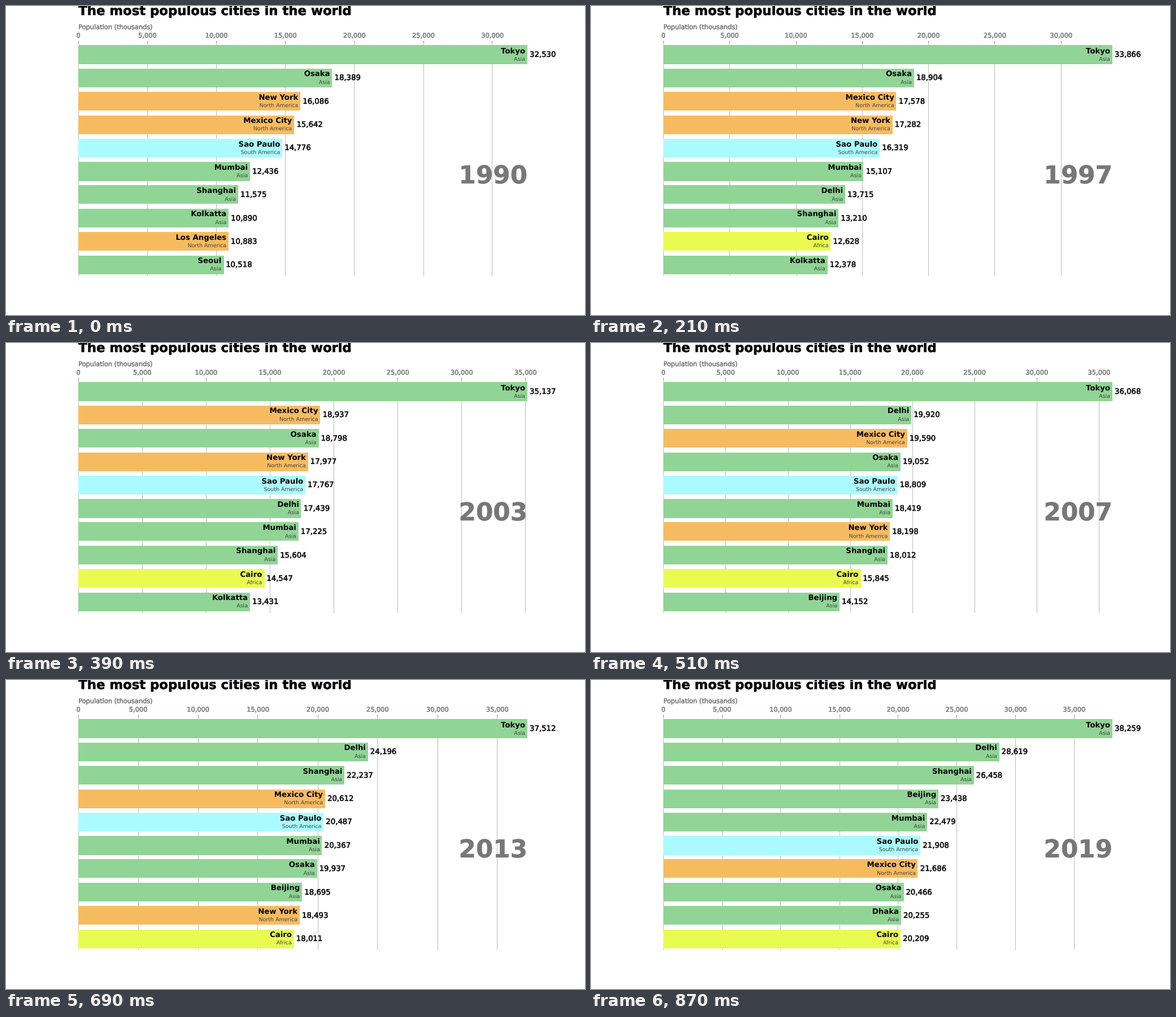
Animation, 1025 px wide and 547 px high, one loop 900 ms. Source, as an HTML page:

```html
<!DOCTYPE html>
<html lang="en">
<head>
<meta charset="utf-8">
<title>The most populous cities in the world</title>
<style>
  html, body { margin: 0; width: 100%; height: 100%; overflow: hidden; background: #fff; }
  svg { display: block; width: 100%; height: 100%; }
  text {
    font-family: "DejaVu Sans", Verdana, sans-serif;
    text-rendering: geometricPrecision;
    stroke-width: .6px;
  }
  .title { font-size: 22.78px; font-weight: 700; stroke: #000; }
  .axis { font-size: 11.39px; fill: #777; stroke: #777; }
  .tick { text-anchor: middle; }
  .year { font-size: 43.65px; font-weight: 700; fill: #777; stroke: #777; text-anchor: end; }
  .name { font-size: 13.28px; font-weight: 700; text-anchor: end; }
  .group { font-size: 9.49px; fill: #444; text-anchor: end; }
  .value { font-size: 13.28px; stroke: #000; }
</style>
</head>
<body>
<svg id="stage" viewBox="0 0 1025 547"></svg>
<script>
// The chart is laid out on a 1080 x 576 sheet and scaled to the stage
const SCALE = 547 / 576;
const LEFT = 135, WIDTH = 837, PAD = WIDTH / 200;
const FIRST_BAR = 73.37, ROW_STEP = 43.506, BAR = 0.8 * ROW_STEP;
const FIRST_YEAR = 1990, YEARS = 30, STEP_MS = 30, ROWS = 10, GAP = 5;

const COLORS = {
  'Asia': '#90d595',
  'North America': '#f7bb5f',
  'South America': '#aafbff',
  'Africa': '#eafb50'
};

// Key populations in thousands, one slot per five years from 1990;
// empty slots are filled with constant growth
const CITIES = [
  ['Tokyo', 'Asia', [32530, , 34450, , , 38001, 38323]],
  ['Osaka', 'Asia', [18389, 18940, , 18762, , 20238, 20523]],
  ['New York', 'North America', [16086, , 17813, , 18365, , 18793]],
  ['Mexico City', 'North America', [15642, , 18457, , , , 21868]],
  ['Sao Paulo', 'South America', [14776, , 17014, , , 21066, 22119]],
  ['Mumbai', 'Asia', [12436, , 16367, , , 21043, 22838]],
  ['Shanghai', 'Asia', [11575, , 13959, , 19980, 23741, 27137]],
  ['Kolkatta', 'Asia', [10890, , 13058, , , , 15726]],
  ['Los Angeles', 'North America', [10883, , , , , , 12500]],
  ['Seoul', 'Asia', [10518, , , , , , 9800]],
  ['Buenos Aires', 'South America', [10513, , , , , , 15894]],
  ['Delhi', 'Asia', [9726, , 15732, , 21935, 25703, 29348]],
  ['Cairo', 'Africa', [9892, 11962, 13626, , , 18772, 20568]],
  ['Beijing', 'Asia', [6788, , , 12813, , 20384, 24201]],
  ['Dhaka', 'Asia', [6621, , , , , , 20989]]
].map(([name, group, keys]) => ({ name, group, data: fill(keys) }));

function fill(keys) {
  const data = [...keys];
  for (let i = 1; i < data.length; i++) {
    if (data[i]) continue;
    const next = data.findIndex((v, j) => j > i && v);
    data[i] = data[i - 1] * (data[next] / data[i - 1]) ** (1 / (next - i + 1));
  }
  return data;
}

function population({ data }, index) {
  const k = Math.floor(index / GAP);
  return data[k] + (data[k + 1] - data[k]) * (index % GAP) / GAP;
}

const stage = document.getElementById('stage');

function set(el, attrs) {
  for (const key in attrs) el.setAttribute(key, attrs[key]);
}

function add(tag, attrs, content = '') {
  const el = document.createElementNS('http://www.w3.org/2000/svg', tag);
  set(el, attrs);
  el.textContent = content;
  return stage.appendChild(el);
}

function label(el, x, content) {
  set(el, { x: x * SCALE });
  el.textContent = content;
}

const format = v => Math.round(v).toLocaleString('en-US');
const snap = v => Math.round(Math.round(v) * SCALE);

const ticks = Array.from({ length: 8 }, (_, i) => ({
  value: i * 5000,
  grid: add('rect', { y: 65, width: 1, height: 413, fill: '#bbb' }),
  mark: add('rect', { y: 62, width: 1, height: 3, fill: '#777' }),
  text: add('text', { class: 'axis tick', y: 56 }, format(i * 5000))
}));

const rows = Array.from({ length: ROWS }, (_, i) => {
  const top = FIRST_BAR + ROW_STEP * i;
  const y = snap(top);
  const text = (kind, dy) =>
    add('text', { class: kind, y: Math.round(top + BAR / 2 + dy) * SCALE });
  return {
    bar: add('rect', { x: snap(LEFT), y, height: snap(top + BAR) - y }),
    name: text('name', -3),
    group: text('group', ROW_STEP / 4),
    value: text('value', 4.2)
  };
});

add('text', { class: 'title', x: LEFT * SCALE, y: 16 }, 'The most populous cities in the world');
add('text', { class: 'axis', x: LEFT * SCALE, y: 41 }, 'Population (thousands)');
const yearText = add('text', { class: 'year', x: (LEFT + WIDTH) * SCALE, y: 314 });

function draw(index) {
  const ranking = CITIES
    .map(city => ({ ...city, value: population(city, index) }))
    .sort((a, b) => b.value - a.value);
  const max = ranking[0].value;
  const toX = v => LEFT + v / max * WIDTH;

  for (const { value, grid, mark, text } of ticks) {
    const x = toX(value);
    const display = value > max ? 'none' : 'inline';
    const line = { x: snap(Math.floor(x)), display };
    set(grid, line);
    set(mark, line);
    set(text, { x: x * SCALE, display });
  }

  rows.forEach((row, i) => {
    const { name, group, value } = ranking[i];
    const x = toX(value);
    set(row.bar, { width: snap(x) - snap(LEFT), fill: COLORS[group] });
    label(row.name, x - PAD, name);
    label(row.group, x - PAD, group);
    label(row.value, x + PAD, format(value));
  });

  yearText.textContent = FIRST_YEAR + index;
}

const start = performance.now();
let shown = 0;
draw(shown);

function tick(now) {
  const index = Math.floor(Math.max(0, now - start) / STEP_MS) % YEARS;
  if (index !== shown) draw(shown = index);
  requestAnimationFrame(tick);
}
requestAnimationFrame(tick);
</script>
</body>
</html>
```
